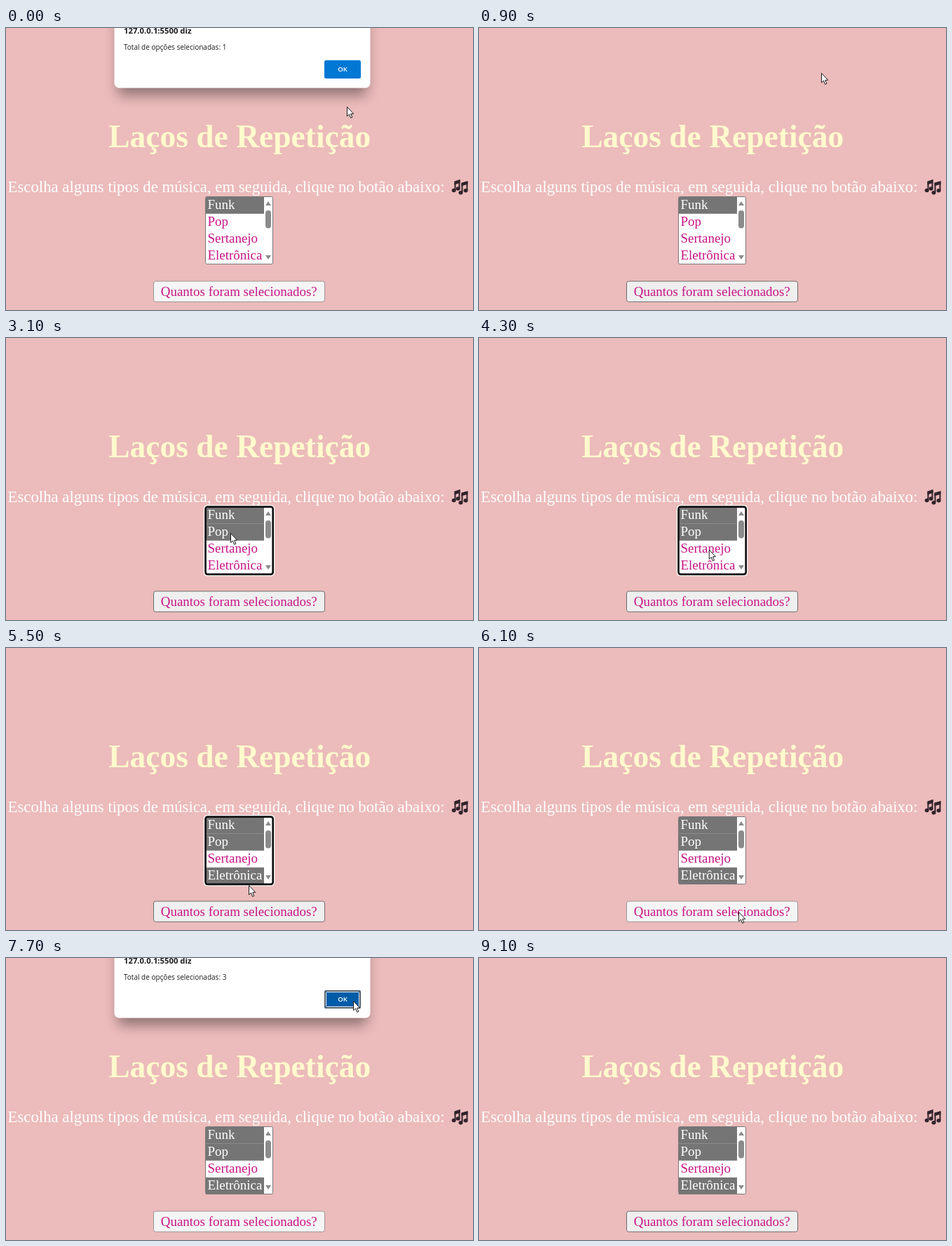
Recreate the animation shown at these times as an HTML page. Size 666 by 402 pixels, loop 9300 ms.

```html
<!DOCTYPE html>
<html lang="pt-BR">
<head>
<meta charset="utf-8">
<title>Laços de Repetição</title>
<style>
  html, body { margin: 0; width: 100%; height: 100%; overflow: hidden; background: #ecbbbb; }
  svg { display: block; width: 666px; height: 402px; }
  .serif { font: 18.96px "Liberation Serif", serif; fill: #c71585; }
  .serif.intro { font-size: 22.75px; fill: #fff; }
  .serif.title { font-size: 45.5px; font-weight: bold; fill: #fffacd; }
  .sans { font: 10px "Open Sans", sans-serif; fill: #1b1b1b; }
  .row.selected rect { fill: #757575; }
  .row.selected text { fill: #fff; }
  .shadow { filter: blur(9px); }
</style>
</head>
<body>
<svg viewBox="0 0 666 402">
  <rect width="666" height="402" fill="#ecbbbb"/>
  <text class="serif title" x="146.2" y="169.5">Laços de Repetição</text>
  <text class="serif intro" x="2.6" y="234">Escolha alguns tipos de música, em seguida, clique no botão abaixo:</text>

  <g id="notes" fill="#30232b" stroke="#30232b" stroke-width="2">
    <path d="M640.5 231V219.5L646.5 217.5V228M650.5 234V221.5L657.5 219.5V231" fill="none"/>
    <path d="M640.5 219.5l6-2v2.5l-6 2zM650.5 221.5l7-2v2.5l-7 2z"/>
    <g stroke="none">
      <ellipse cx="638.7" cy="231.5" rx="3" ry="2.7"/>
      <ellipse cx="644.7" cy="229" rx="3" ry="2.7"/>
      <ellipse cx="648.5" cy="234.8" rx="3" ry="2.7"/>
      <ellipse cx="655.6" cy="231.8" rx="3" ry="2.7"/>
    </g>
  </g>

  <rect x="284.5" y="240.5" width="96" height="96" rx="2" fill="#fff"/>
  <g id="rows"></g>
  <g fill="#8b8b8b">
    <path d="M370 253l4-6 4 6zM370 324l4 6 4-6z"/>
    <rect x="370" y="260" width="8" height="25.5" rx="4"/>
  </g>
  <rect id="listBorder" x="284.5" y="240.5" width="96" height="96" rx="2" fill="none" stroke="#767676"/>
  <g id="focusRing" fill="none">
    <rect x="282.9" y="239" width="99.3" height="99.5" rx="4" stroke="#fff" stroke-width="2"/>
    <rect x="284.5" y="240.6" width="96.2" height="96.2" rx="3" stroke="#101010" stroke-width="2.7"/>
  </g>

  <rect id="button" x="210.5" y="361" width="244" height="29.3" rx="3"/>
  <text class="serif" x="220.8" y="382">Quantos foram selecionados?</text>

  <g id="dialog">
    <rect class="shadow" x="159" y="-40" width="356" height="136" rx="8" fill-opacity=".38"/>
    <rect x="154.5" y="-20" width="365" height="105.5" rx="7" fill="#fff"/>
    <text class="sans" x="168" y="8" style="font-size:11.3px;font-weight:bold">127.0.0.1:5500 diz</text>
    <text class="sans" x="168" y="31">Total de opções selecionadas: <tspan id="count"></tspan></text>
    <rect id="ok" x="454" y="46" width="52" height="26" rx="2.5"/>
    <g id="okRing" fill="none">
      <rect x="455" y="47" width="50" height="24" rx="2" stroke="#56626e" stroke-width="2"/>
      <rect x="456.5" y="48.5" width="47" height="21" rx="1" stroke="#e8f0f7"/>
    </g>
    <text class="sans" x="480" y="62.4" text-anchor="middle" style="font-size:9.6px;font-weight:600;fill:#fff">OK</text>
  </g>

  <path id="cursor" d="M.5 .5V13.8L3.5 11 5.6 16.3 7.8 15.3 5.7 10.3H9.7Z" fill="#fff" stroke="#1a1a1a"/>
</svg>
<script>
const LOOP = 9300, STEP = 100;
const $ = id => document.getElementById(id);

$('rows').innerHTML = ['Funk', 'Pop', 'Sertanejo', 'Eletrônica'].map((name, i) => `
  <g class="row">
    <rect x="285" y="${240.8 + i * 24}" width="83" height="24" fill="none"/>
    <text class="serif" x="287.5" y="${258 + i * 24}">${name}</text>
  </g>`).join('');
const rows = document.querySelectorAll('.row');

// Pointer path: time, x, y
const path = [
  [0, 486, 112], [600, 488, 64], [1100, 488, 64], [2100, 348, 262],
  [2800, 320, 278], [3700, 320, 278], [4100, 327, 300], [4400, 328, 302],
  [4800, 332, 314], [5100, 332, 314], [5200, 335, 316], [5400, 335, 316],
  [5500, 346, 338], [6100, 370, 376], [6700, 370, 376], [7700, 495, 61],
  [8100, 495, 61], [8200, 488, 56], [8400, 488, 56], [8500, 446, 29], [8600, 446, 29]
];

const between = (t, from, to) => t >= from && t < to;
const show = (id, on) => $(id).setAttribute('visibility', on ? 'inherit' : 'hidden');
const inside = ([x, y], left, top, right, bottom) => between(x, left, right) && between(y, top, bottom);

function pointerAt(t) {
  const i = path.findIndex(key => key[0] > t);
  if (i < 0) return path.at(-1).slice(1);
  const [t0, x0, y0] = path[i - 1], [t1, x1, y1] = path[i];
  const u = (t - t0) / (t1 - t0), k = u * u * (3 - 2 * u);
  return [x0 + (x1 - x0) * k, y0 + (y1 - y0) * k];
}

function draw(t) {
  const pointer = pointerAt(t);
  const secondDialog = between(t, 6400, 8200);
  const pressed = t < 900 || between(t, 6100, 8200);
  const dialogOpen = t < 900 || secondDialog;

  $('cursor').setAttribute('transform', `translate(${pointer})`);
  show('cursor', t < 8600);

  const selected = [true, t >= 2800, false, t >= 4700];
  rows.forEach((row, i) => row.classList.toggle('selected', selected[i]));
  show('focusRing', between(t, 2800, 6100));

  const hovered = inside(pointer, 210, 361, 455, 391);
  $('button').setAttribute('fill', pressed ? '#f5f5f5' : hovered ? '#e5e5e5' : '#efefef');
  $('button').setAttribute('stroke', pressed ? '#9c9494' : '#6f6b6b');

  show('dialog', dialogOpen);
  show('okRing', secondDialog);
  $('count').textContent = secondDialog ? 3 : 1;
  $('ok').setAttribute('fill', inside(pointer, 454, 46, 506, 72) ? '#005ca8' : '#0078d4');
}

// okRing must inherit hiding from the dialog, so its visible state is "inherit".
const start = performance.now();
function frame() {
  const t = (performance.now() - start) % LOOP;
  draw(Math.floor(t / STEP) * STEP);
  requestAnimationFrame(frame);
}
frame();
</script>
</body>
</html>
```
